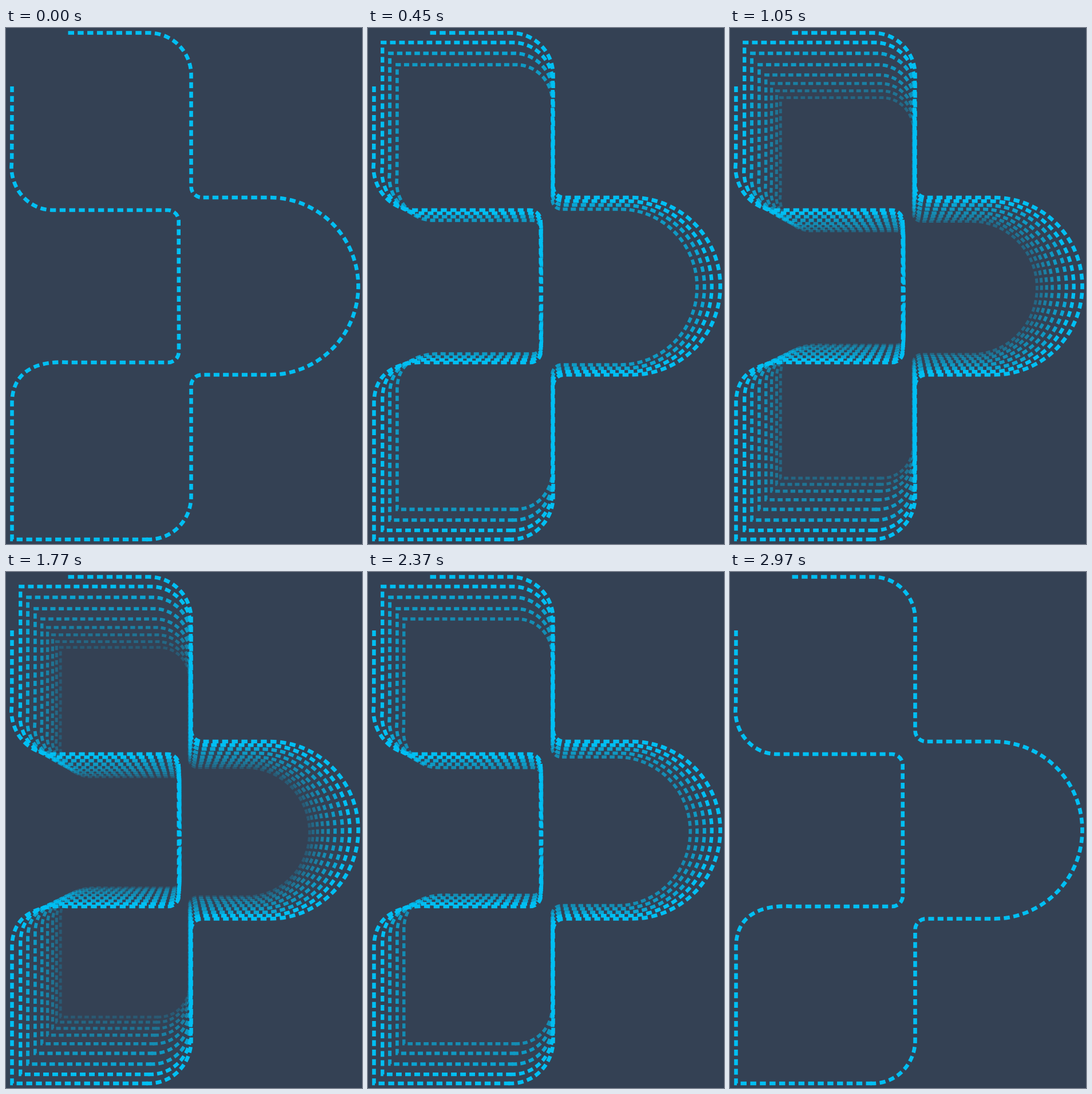
Animation of 622 by 901 pixels, one loop 3120 ms. Source, as an HTML page:

```html
<!DOCTYPE html>
<html lang="en">
<head>
<meta charset="utf-8">
<title>Dashed outline echo</title>
<style>
  html, body { margin: 0; width: 100%; height: 100%; overflow: hidden; background: #344154; }
  svg { display: block; width: 622px; height: 901px; }
  path { fill: none; stroke: #00bff3; stroke-width: 6.6; }
</style>
</head>
<body>
<svg id="stage" viewBox="0 0 622 901"></svg>
<script>
const LOOP = 3120, STEP = 150, DASH = 62;

// Outline pieces: path and number of dash periods along it.
// Pieces start and end in the middle of a gap.
const pieces = [
  ['M122 8.5H250A73.5 73.5 0 0 1 323.5 82V91.5', 15],
  ['M323.5 91.5V258.5', 10],
  ['M323.5 258.5V277A19 19 0 0 0 342.5 296H357.5', 4],
  ['M357.5 296H460.5A155 154.75 0 0 1 460.5 605.5H441.5', 36],
  ['M441.5 605.5H342.5A19 19 0 0 0 323.5 624.5V659.5', 10],
  ['M323.5 659.5V809.5', 9],
  ['M323.5 809.5V818A73.5 75 0 0 1 250 893H245', 7.81],
  ['M248 893H10.5V881', 14.81, 0],
  ['M10.5 881V664', 13],
  ['M10.5 664V655C10.5 616 32 584 97 583.5L111.5 584', 9],
  ['M111.5 584H279.5', 10],
  ['M279.5 584H283A19 19 0 0 0 302 565V547.5', 3],
  ['M302 547.5L301.7 348.3', 12],
  ['M301.7 348.3V337A19 19 0 0 0 282.7 318H258.5', 4],
  ['M258.5 318H90.5', 10],
  ['M90.5 318H82A72.5 76 0 0 1 9.5 242L10.2 232', 8],
  ['M10.2 232L10.5 115.5', 7]
];
const corner = ['M10.5 115.5V8.5H122', 13];
const openEnds = 'M10.5 112V102M108.5 8.5H119';

// Bounds of each outline, outermost first: left, top, right, bottom.
const bounds = [
  [6, 5, 619, 897], [21, 22, 604, 881], [34, 41, 591, 863], [47, 61, 578, 844],
  [59, 79, 566, 827], [69, 94, 556, 812], [78, 107, 547, 800],
  [85, 119, 539, 789], [92, 129, 533, 780], [99, 139, 526, 770]
];

const stage = document.getElementById('stage');

function add(parent, tag, attrs) {
  const el = document.createElementNS('http://www.w3.org/2000/svg', tag);
  for (const name in attrs) el.setAttribute(name, attrs[name]);
  return parent.appendChild(el);
}

function addDashed(parent, [d, periods, offset = DASH - 100 + (100 - DASH) / 2]) {
  add(parent, 'path', {
    d,
    pathLength: periods * 100,
    'stroke-dasharray': `${DASH} ${100 - DASH}`,
    'stroke-dashoffset': offset
  });
}

const [x0, y0, x1, y1] = bounds[0];
const layers = bounds.map(([l, t, r, b], k) => {
  const sx = (r - l) / (x1 - x0), sy = (b - t) / (y1 - y0);
  const g = add(stage, 'g', {
    transform: `translate(${l} ${t}) scale(${sx} ${sy}) translate(${-x0} ${-y0})`,
    opacity: k < 2 ? 1 : 1 - k / 10
  });
  pieces.forEach(p => addDashed(g, p));
  if (k) addDashed(g, corner);
  else add(g, 'path', { d: openEnds });
  return g;
});

function draw(now) {
  const t = now % LOOP;
  layers.forEach((g, k) => {
    const on = t >= k * STEP && t < LOOP - k * STEP;
    g.style.display = on ? '' : 'none';
  });
}

const start = performance.now();
function tick() {
  draw(performance.now() - start);
  requestAnimationFrame(tick);
}
tick();
</script>
</body>
</html>
```
